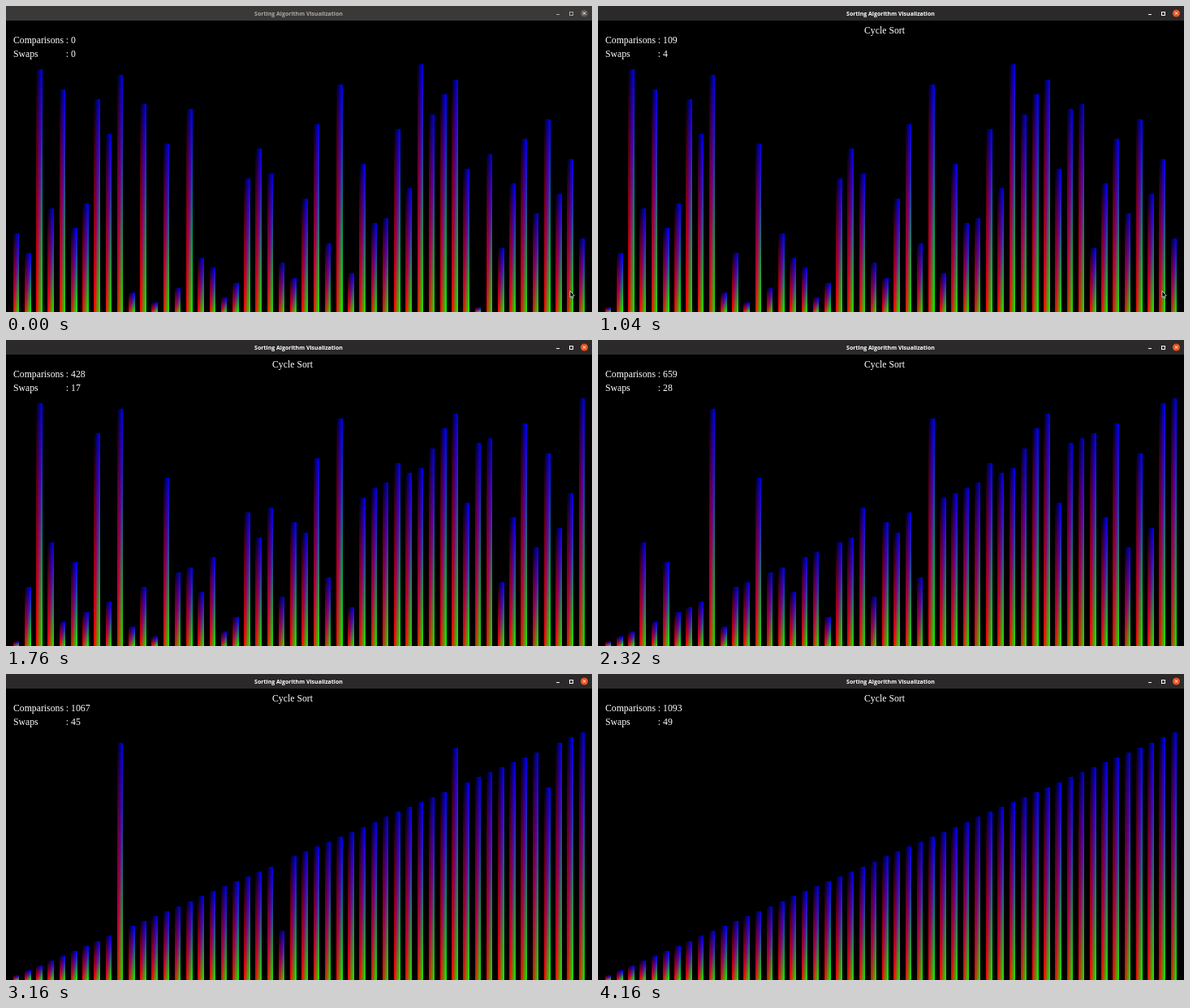
An HTML page with a canvas for the animation above (4200 ms loop, 722x378 px).

```html
<!DOCTYPE html>
<html lang="en">
<head>
<meta charset="utf-8">
<title>Sorting Algorithm Visualization</title>
<style>
  html, body { margin: 0; height: 100%; overflow: hidden; background: #000; }
  canvas { display: block; }
</style>
</head>
<body>
<canvas id="stage" width="722" height="378"></canvas>
<script>
const W = 722, H = 378, LOOP = 4200, TICK = 40;
const FOCUS_AT = 280, LABEL_AT = 720, POINTER_GONE = 1400;
const SORT_AT = 782, WRITE_MS = 51.5;
const BAR = { x: 8.8, pitch: 14.22, w: 7.6, unit: 6.125 };
const ctx = document.getElementById('stage').getContext('2d');

const start = [
  16, 12, 49, 21, 45, 17, 22, 43, 36, 48, 4, 42, 2, 34, 5, 41, 11, 9, 3, 6,
  27, 33, 28, 10, 7, 23, 38, 14, 46, 8, 30, 18, 19, 37, 25, 50, 40, 44, 47, 29,
  1, 32, 13, 26, 35, 20, 39, 24, 31, 15
];

// Cycle sort, keeping the picture after every write.
function cycleSort(values) {
  const a = [...values];
  const states = [{ bars: values, comparisons: 0, swaps: 0 }];
  let found = 0;
  for (let s = 0; s < a.length - 1; s++) {
    if (a[s] === s + 1) continue;
    let item = a[s], pos;
    do {
      pos = item - 1;
      found += pos - s;
      [a[pos], item] = [item, a[pos]];
      const swaps = states.length - 1;
      states.push({ bars: [...a], comparisons: found + swaps, swaps });
    } while (pos !== s);
  }
  return states;
}

// Two shaded triangles: black, blue, green and red corners, split along red-blue.
function makeBar(w, h) {
  const c = document.createElement('canvas');
  c.width = w;
  c.height = h;
  const g = c.getContext('2d');
  for (let y = 0; y < h; y++) {
    const v = (y + 0.5) / h, low = 255 * v, high = 255 - low;
    const row = g.createLinearGradient(0, 0, w, 0);
    row.addColorStop(0, `rgb(${low},0,0)`);
    row.addColorStop(1 - v, `rgb(${low},0,${high})`);
    row.addColorStop(1, `rgb(0,${low},${high})`);
    g.fillStyle = row;
    g.fillRect(0, y, w, 1);
  }
  return c;
}

const states = cycleSort(start);
const barImage = makeBar(32, 306);

function rect(color, x, y, w, h) {
  ctx.fillStyle = color;
  ctx.fillRect(x, y, w, h);
}

function text(str, x, y, font, color = '#fff', align = 'left') {
  ctx.font = font;
  ctx.fillStyle = color;
  ctx.textAlign = align;
  ctx.fillText(str, x, y);
}

function line(points, color, width) {
  ctx.beginPath();
  points.forEach(([x, y], i) => i % 2 ? ctx.lineTo(x, y) : ctx.moveTo(x, y));
  ctx.strokeStyle = color;
  ctx.lineWidth = width;
  ctx.stroke();
}

function drawTitleBar(active) {
  const ink = active ? '#fff' : '#aaa8a5';
  rect(active ? '#2b2929' : '#3b3937', 0, 0, W, 18);
  text('Sorting Algorithm Visualization', 360.5, 11.8,
    'bold 7px "Open Sans", "Noto Sans", sans-serif', ink, 'center');
  line([[678, 10.5], [682, 10.5]], ink, 1);
  ctx.strokeRect(694.5, 7.5, 4, 4);
  ctx.beginPath();
  ctx.arc(712.5, 9, 4.6, 0, 7);
  ctx.fillStyle = active ? '#e9501f' : '#5a5754';
  ctx.fill();
  line([[710.8, 7.3], [714.2, 10.7], [714.2, 7.3], [710.8, 10.7]], '#fff', 1);
}

function drawPointer(x, y) {
  ctx.beginPath();
  [[0, 0], [0, 8], [1.8, 6.4], [3, 9], [4.2, 8.4], [3.1, 6], [5.4, 5.8]]
    .forEach(([dx, dy]) => ctx.lineTo(x + dx, y + dy));
  ctx.closePath();
  ctx.fillStyle = '#000';
  ctx.fill();
  ctx.strokeStyle = '#ddd';
  ctx.lineWidth = 0.8;
  ctx.stroke();
}

function draw(t) {
  const writes = Math.floor((t - SORT_AT) / WRITE_MS);
  const state = states[Math.max(0, Math.min(states.length - 1, writes))];
  const serif = '11.75px "Liberation Serif", serif';

  rect('#000', 0, 0, W, H);
  state.bars.forEach((value, i) => {
    const h = value * BAR.unit - 0.6;
    ctx.drawImage(barImage, BAR.x + i * BAR.pitch, H - h, BAR.w, h);
  });

  text('Comparisons', 9, 46, serif);
  text(': ' + state.comparisons, 73.8, 46, serif);
  text('Swaps', 9, 63, serif);
  text(': ' + state.swaps, 73.8, 63, serif);
  if (t >= LABEL_AT) text('Cycle Sort', 353, 34, serif, '#fff', 'center');

  drawTitleBar(t >= FOCUS_AT);
  if (t < POINTER_GONE) drawPointer(695, 352);
}

function frame() {
  const t = performance.now() % LOOP;
  draw(Math.floor(t / TICK) * TICK);
  requestAnimationFrame(frame);
}
frame();
</script>
</body>
</html>
```
